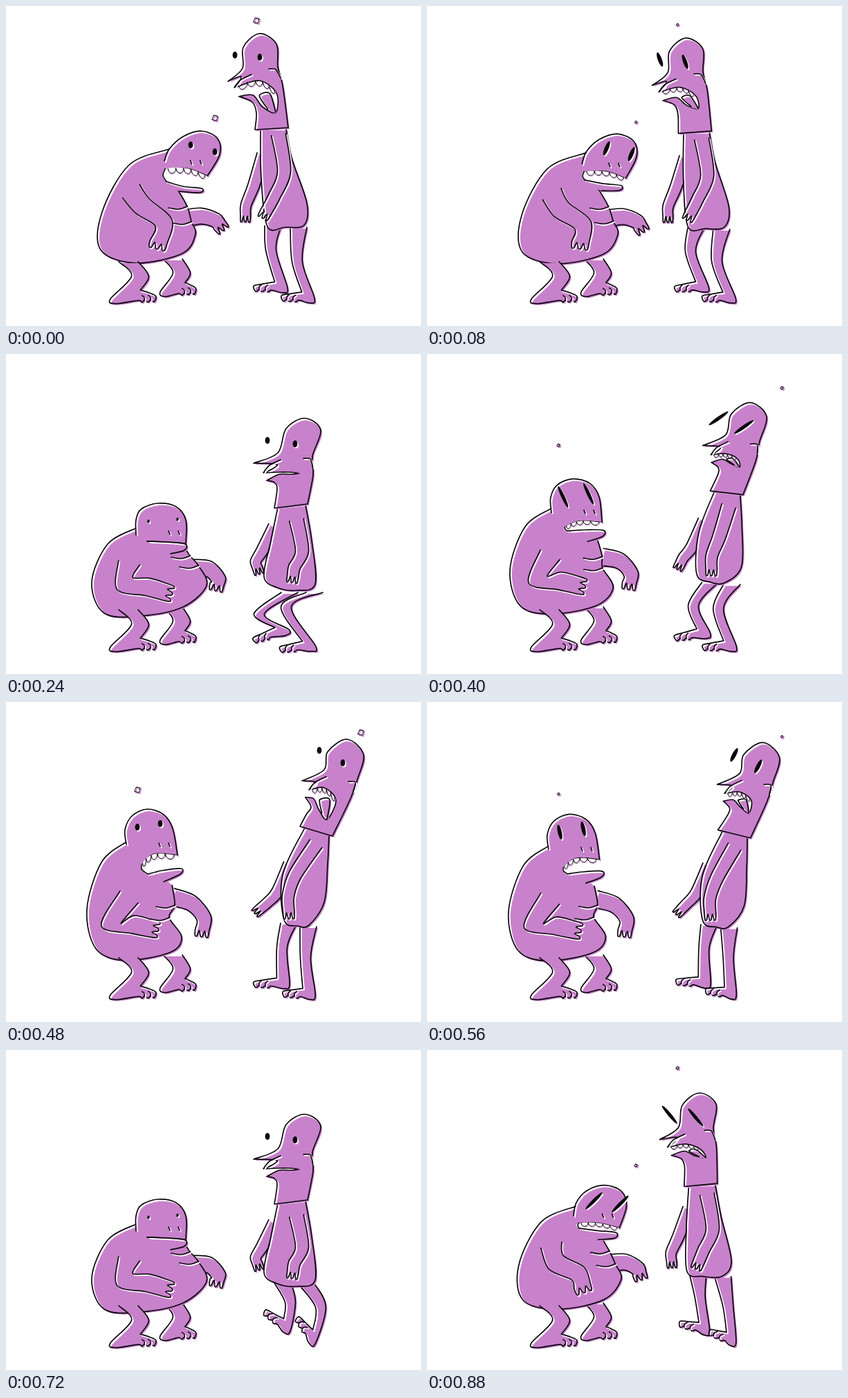
Animation, 600 px wide and 463 px high, one loop 960 ms. Source, as an HTML page with a canvas:

```html
<!DOCTYPE html>
<html lang="en">
<head>
<meta charset="utf-8">
<title>Two bickering creatures</title>
<style>
html, body { margin: 0; width: 100%; height: 100%; overflow: hidden; background: #fff; }
canvas { display: block; width: 600px; height: 463px; }
</style>
</head>
<body>
<canvas id="stage" width="600" height="463"></canvas>
<script>
const ctx = document.getElementById('stage').getContext('2d');
const SKIN = '#c882cb', INK = '#0c060e', STEP = 80;

// One beat: rise to an extreme, squash, and rebound to the other extreme.
const BEAT = [
  { squash: 0, open: 1, squint: 0, drop: 1 },
  { squash: .12, open: .65, squint: .5, drop: .4 },
  { squash: .26, open: .35, squint: 1, drop: 0 },
  { squash: 1, open: 0, squint: 0, drop: 0 },
  { squash: .7, open: .15, squint: .5, drop: 0 },
  { squash: .42, open: .4, squint: 1, drop: .5 }
];

// Points are "x,y"; "*" marks a corner. Tilt is the angle of squinting eyes.
const squat = {
  right: {
    far: '258,308 282,304 303,310 312,321',
    body: '236,207 178,230 139,298 137,353 188,372 255,358 274,330 268,312 262,290 246,262',
    head: '229,224 236,207 256,189 283,181 306,192 309,215 291,246* 262,235 230,236',
    jaw: '232,254 256,261 283,264 280,270 250,268',
    near: '181,268 198,290 228,314 219,347',
    eyes: '267,201 302,211', drop: '302,162', tilt: 135
  },
  left: {
    far: '240,282 268,291 286,312 283,335',
    body: '173,203 138,232 117,300 130,357 172,374 238,362 254,340 236,312 244,294 240,265',
    head: '174,206 172,185 182,165 204,155 228,163 241,183 248,222* 214,220 196,236',
    jaw: '205,249 225,244 253,241 252,249 228,260',
    near: '178,282 152,322 183,322 216,329',
    eyes: '190,181 223,176', drop: '190,127', tilt: 65
  },
  down: {
    far: '270,310 293,311 307,325 304,338',
    body: '188,252 147,275 124,330 142,375 195,379 256,366 290,335 278,306 266,292 256,276',
    head: '188,262 188,240 196,224 220,216 246,221 260,240 260,274* 230,272 204,271',
    jaw: '204,271 232,272 259,275 258,284 238,289',
    near: '178,302 172,332 205,337 236,346',
    eyes: '206,242 248,239', drop: '240,160', tilt: 90
  }
};
const squatLegs = ['241,366 254,386 224,417 275,413', '177,370 194,391 152,427 217,424'];

const tall = {
  left: {
    far: '372,215 358,260 347,288 346,308',
    legs: '386,318 383,353 406,411 358,409 423,320 421,370 445,426 398,423',
    body: '368,178 369,250 378,319 404,320 431,317 435,285 413,220 405,178',
    near: '394,186 402,240 388,275 373,303',
    head: '332,118* 340,102 321,109* 342,90 343,60 366,40 391,55 393,88 400,115 408,176* 360,179*',
    jaw: '362,155 356,139 337,131',
    mouth: '357,129 371,146 390,154 391,126 366,108',
    eyes: '331,71 367,74', drop: '362,21', tilt: 50
  },
  right: {
    far: '410,235 392,275 378,290 363,303',
    legs: '409,320 399,355 409,411 358,409 437,325 433,370 446,427 400,423',
    body: '432,182 400,250 402,315 422,324 438,323 460,290 465,235 467,192',
    near: '448,205 418,250 408,280 409,309',
    head: '440,127* 448,116 428,114* 460,98 465,72 493,54 517,76 508,112 498,140 472,194* 425,180*',
    jaw: '434,163 441,152 433,138',
    mouth: '445,140 452,155 464,170 477,142 460,124',
    eyes: '453,70 487,88', drop: '513,44', tilt: 145
  },
  crouch: {
    far: '388,250 370,285 361,300 365,314',
    legs: '410,345 366,376 409,402 358,415 446,345 405,366 447,426 396,428',
    body: '393,222 383,270 373,322 392,338 420,342 447,333 442,270 433,218',
    near: '420,240 428,285 417,308 414,326',
    head: '374,172* 392,160 358,158* 393,143 405,108 432,93 455,110 443,148 444,175 436,217* 388,223*',
    jaw: '392,195 388,186 377,183',
    mouth: '395,174 410,174 424,173 410,171 392,171',
    eyes: '378,125 418,130', drop: '420,60', tilt: 90
  }
};
const hop = { ...tall.crouch, legs: '400,337 411,365 408,409 373,379 434,338 455,372 444,426 420,388' };

const parse = text => text.split(' ').flatMap(p => {
  const xy = p.replace('*', '').split(',').map(Number);
  return p.endsWith('*') ? [xy, xy] : [xy];
});
const mapPose = (pose, fn) => Object.fromEntries(Object.keys(pose).map(key => [key, fn(pose[key], key)]));
const parsePose = pose => mapPose(pose, v => typeof v === 'string' ? parse(v) : v);
const mix = (a, b, t) => Array.isArray(a) ? a.map((v, i) => mix(v, b[i], t)) : a + (b - a) * t;
const add = (p, dx, dy) => [p[0] + dx, p[1] + dy];

// Mouth parts hang from the lip and close at their own pace.
function blend(up, down, beat, lip) {
  const pose = mapPose(up, (v, key) => mix(v, down[key], beat.squash));
  const hang = (from, key) => from[key].map(p => add(p, -lip(from)[0], -lip(from)[1]));
  for (const key of ['jaw', 'mouth']) {
    if (up[key]) {
      pose[key] = mix(hang(up, key), hang(down, key), 1 - beat.open).map(p => add(p, ...lip(pose)));
    }
  }
  pose.drop = add(up.drop[0], 0, 10 * (1 - beat.drop));
  pose.tilt = mix(90, up.tilt, beat.squint);
  return pose;
}

// Smooth open curve; doubled points stay sharp.
function curve(pts) {
  const path = new Path2D(), at = i => pts[Math.max(0, Math.min(pts.length - 1, i))];
  path.moveTo(...pts[0]);
  for (let i = 0; i < pts.length - 1; i++) {
    const [a, b, c, d] = [at(i - 1), at(i), at(i + 1), at(i + 2)];
    if (b[0] === c[0] && b[1] === c[1]) continue;
    path.bezierCurveTo(b[0] + (c[0] - a[0]) / 6, b[1] + (c[1] - a[1]) / 6,
      c[0] - (d[0] - b[0]) / 6, c[1] - (d[1] - b[1]) / 6, c[0], c[1]);
  }
  return path;
}

function shifted(shift, paint) {
  ctx.save();
  ctx.translate(shift, shift);
  paint();
  ctx.restore();
}

function stroke(path, color, width, shift = 0) {
  shifted(shift, () => {
    ctx.strokeStyle = color;
    ctx.lineWidth = width;
    ctx.stroke(path);
  });
}

function fill(path, color, shift = 0) {
  shifted(shift, () => {
    ctx.fillStyle = color;
    ctx.fill(path);
  });
}

// Skin is printed slightly off register from the ink.
function solid(pts) {
  const path = curve(pts);
  fill(path, SKIN, 2);
  ctx.save();
  ctx.clip(path);
  stroke(path, '#fff', 2, 1.9);
  ctx.restore();
  stroke(path, INK, 1.7);
}

function line(pts) {
  const path = curve(pts);
  stroke(path, '#fff', 1.8, 1.7);
  stroke(path, INK, 1.6);
}

// Outline of a tube around shoulder, elbow, wrist and knuckles, with three fingers.
function arm(pts, width) {
  const frame = i => {
    const a = pts[Math.max(0, i - 1)], b = pts[Math.min(3, i + 1)];
    const len = Math.hypot(b[0] - a[0], b[1] - a[1]);
    return [(b[0] - a[0]) / len, (b[1] - a[1]) / len];
  };
  const at = (i, across, along = 0) => {
    const [dx, dy] = frame(i);
    return add(pts[i], dx * along - dy * across, dy * along + dx * across);
  };
  const edge = side => [0, 1, 2].map(i => at(i, side * width * (.58 - .05 * i)));
  const hand = [at(3, width * .46, -5)];
  for (const k of [1, 0, -1]) {
    hand.push(at(3, width * (k * .36 + .06), 4), at(3, width * (k * .36 - .06), 4));
    if (k >= 0) hand.push(at(3, width * (k * .36 - .18), -4));
  }
  return [...edge(1), ...hand, at(3, -width * .46, -5), ...edge(-1).reverse()];
}

function leg([hip, knee, heel, toe], { thigh, calf, instep, rise }) {
  const side = Math.sign(toe[0] - heel[0]), len = Math.hypot(toe[0] - heel[0], toe[1] - heel[1]);
  const [ux, uy] = [(toe[0] - heel[0]) / len, (toe[1] - heel[1]) / len];
  const foot = (along, up) => add(heel, ux * along + uy * side * up, uy * along - ux * side * up);
  const ankle = foot(instep, rise);
  const toes = [0, 1, 2].flatMap(i => [foot(len - 3 - i * 9, -4), foot(len - 8 - i * 9, -1)]);
  solid([
    add(hip, side * thigh / 2, 0), add(knee, side * calf / 2, 0), ankle, ankle,
    foot(mix(instep, len, .6), rise * .65), foot(len, 4), ...toes, foot(6, -4), foot(-1, 3),
    add(knee, -side * calf / 2, 0), add(hip, -side * thigh / 2, 0)
  ]);
  for (const x of [len - 8, len - 17]) line([foot(x, -1), foot(x, 3), foot(x - 3, 6)]);
}

function teeth(a, mid, b, open) {
  if (open === 0) return;
  const count = 5, depth = 5 + 5 * open;
  const bow = mid.map((v, k) => 2 * v - (a[k] + b[k]) / 2);
  const at = t => mix(mix(a, bow, t), mix(bow, b, t), t);
  const path = new Path2D();
  path.moveTo(...at(.06));
  for (let i = 0; i < count; i++) {
    const p = at(.06 + .88 * i / count), q = at(.06 + .88 * (i + 1) / count);
    path.bezierCurveTo(p[0] + 1, p[1] + depth, q[0], q[1] + depth, ...q);
  }
  stroke(path, SKIN, 1, 1);
  stroke(path, INK, 1);
}

function face(p, beat, dot) {
  const long = mix(5, 17, beat.squint) * dot, thin = mix(3.4, 2.5, beat.squint) * dot;
  for (const [x, y] of p.eyes) {
    const path = new Path2D();
    path.ellipse(x, y, long, thin, p.tilt * Math.PI / 180, 0, Math.PI * 2);
    fill(path, '#fff', 1.6);
    fill(path, INK);
  }
  if (beat.drop > 0) {
    const r = 4 * beat.drop, [x, y] = p.drop, path = new Path2D();
    [[-.5, -1], [1, -.7], [.6, 1], [-1, .6]].forEach(([dx, dy]) => path.lineTo(x + r * dx, y + r * dy));
    path.closePath();
    stroke(path, SKIN, 1.5, 1.5);
    stroke(path, INK, 1);
  }
}

function drawSquat(p, beat) {
  const size = { thigh: 28, calf: 25, rise: 14 };
  const [farLeg, nearLeg] = squatLegs.map(parse);
  solid(arm(p.far, 22));
  leg(farLeg, { ...size, instep: 36 });
  solid(p.body);
  leg(nearLeg, { ...size, instep: 43 });
  line(arm(p.near, 27));
  for (const i of [7, 8]) line([add(p.body[i], -27, 2), add(p.body[i], -13, 4), p.body[i]]);

  solid(p.head);
  const [nose, lip, corner] = p.head.slice(-3);
  fill(curve([nose, lip, corner, ...p.jaw.slice(0, 3)]), '#fff');
  line([corner, add(mix(corner, p.jaw[0], .5), -4 * beat.open, 0), p.jaw[0]]);
  solid(p.jaw);
  teeth(corner, lip, nose, beat.open);
  const snout = mix(lip, nose, .5);
  for (const dx of [-10, 4]) line([add(snout, dx, -17), add(snout, dx + 2, -12)]);
  face(p, beat, mix(1, .5, beat.open ? 0 : 1));
}

function drawTall(p, beat) {
  const size = { thigh: 24, calf: 15, instep: 18, rise: 11 };
  solid(arm(p.far, 16));
  leg(p.legs.slice(0, 4), size);
  leg(p.legs.slice(4), size);
  solid(p.body);
  line(arm(p.near, 18));

  solid([...p.head, ...p.jaw]);
  const lip = p.head[0], [chin, tongue, throat, palate, gum] = p.mouth;
  const mouth = curve([p.jaw[2], ...p.mouth, lip]);
  fill(mouth, '#fff');
  stroke(mouth, INK, 1.6);
  if (beat.open > .2) {
    const tip = mix(chin, palate, .3);
    solid([mix(tongue, throat, .4), mix(tongue, tip, .6), tip, mix(tip, palate, .6), throat]);
  }
  teeth(lip, gum, palate, beat.open);
  line([add(lip, -2, 0), add(lip, 7, -11), add(lip, 23, -19)]);
  const [brow, cheek] = p.head.slice(9, 11);
  line([add(brow, -13, 3), add(brow, -3, 4), mix(brow, cheek, .6)]);
  face(p, beat, 1);
}

const S = mapPose(squat, parsePose), T = mapPose(tall, parsePose), hopPose = parsePose(hop);
for (const set of [S, T]) {
  for (const pose of Object.values(set)) pose.drop = [pose.drop[0]];
}
const squatLip = p => p.head[p.head.length - 1], tallLip = p => p.head[0];
let shown = -1;

function draw(now) {
  const step = Math.floor(now / STEP) % (BEAT.length * 2);
  if (step === shown) return;
  shown = step;
  const beat = BEAT[step % BEAT.length], first = step < BEAT.length;
  // The swap of sides happens while squashed.
  const home = first === (step % BEAT.length <= 3);
  ctx.fillStyle = '#fff';
  ctx.fillRect(0, 0, 600, 463);
  ctx.lineCap = ctx.lineJoin = 'round';
  drawSquat(blend(home ? S.right : S.left, S.down, beat, squatLip), beat);
  drawTall(blend(home ? T.left : T.right, first ? T.crouch : hopPose, beat, tallLip), beat);
}

const start = performance.now();
function tick() {
  draw(performance.now() - start);
  requestAnimationFrame(tick);
}
tick();
</script>
</body>
</html>
```
